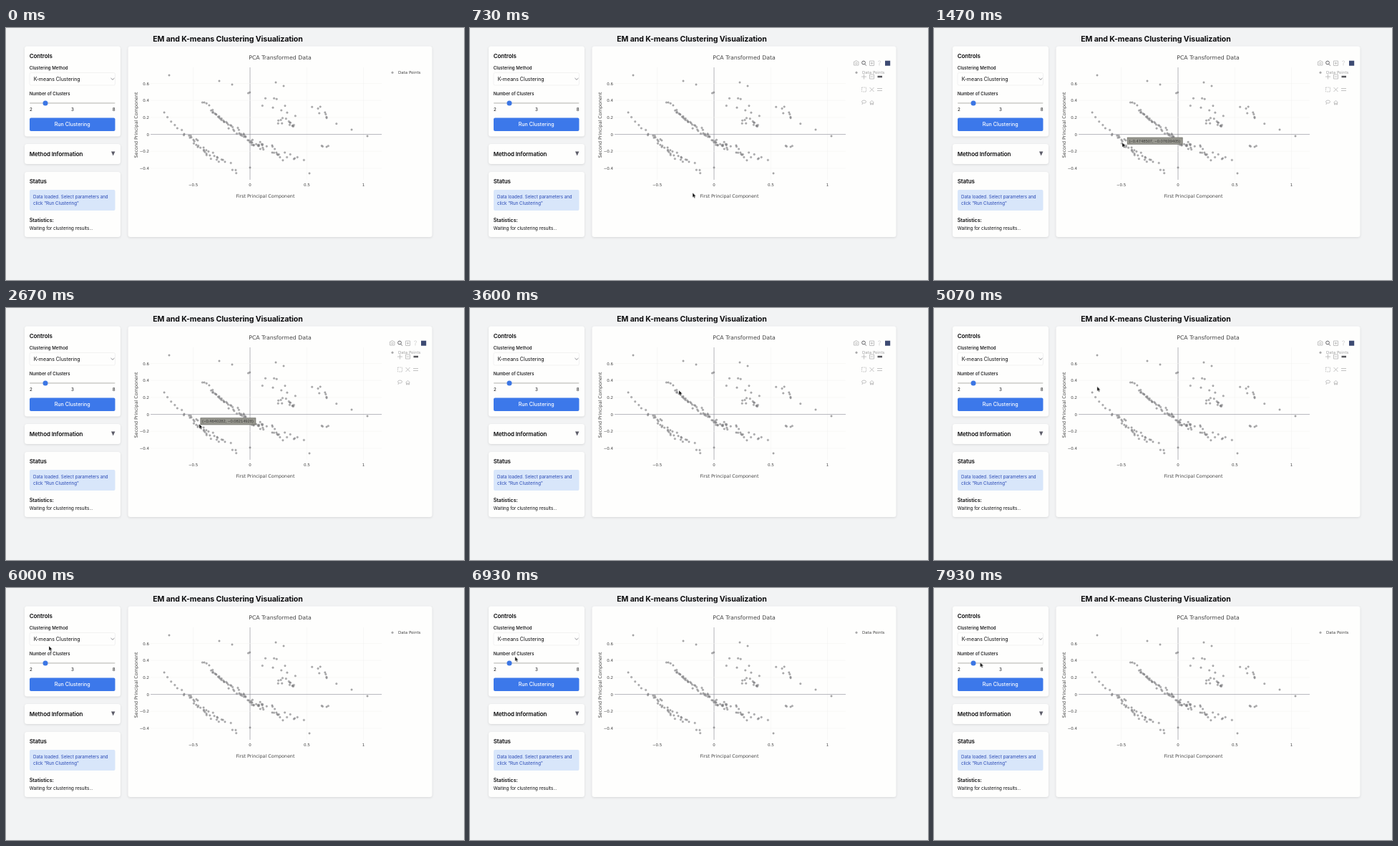
These frames come from a looping animation (640 by 352 pixels, 8 s). An HTML page:

```html
<!DOCTYPE html>
<html lang="en">
<head>
<meta charset="utf-8">
<title>Clustering Visualization</title>
<style>
  html, body { margin: 0; width: 100%; height: 100%; overflow: hidden; background: #f2f3f4; }
  svg { display: block; width: 640px; height: 352px; }
  text { font-family: Inter, sans-serif; font-size: 6.2px; fill: #0c0c0e; }
  .title { font-size: 10.6px; font-weight: 700; letter-spacing: -.1px; text-anchor: middle; }
  .head { font-size: 8px; font-weight: 600; letter-spacing: -.1px; }
  .label { font-size: 6.1px; font-weight: 500; }
  .body { font-size: 7px; }
  .bold { font-size: 7.1px; font-weight: 600; }
  .info { fill: #2546b4; }
  .button { font-size: 7.1px; font-weight: 500; fill: #fff; text-anchor: middle; }
  .card { fill: #fefefd; filter: drop-shadow(0 1.8px 1.6px #0000001c); }
  .plot text { font-family: "DejaVu Sans", sans-serif; font-size: 5.5px; fill: #444; }
  .plot .name { font-size: 7.8px; }
  .plot .axis { font-size: 6.4px; }
  .mid { text-anchor: middle; }
  .end { text-anchor: end; }
  .grid { stroke: #f1f1ee; stroke-width: .5; }
  .zero { stroke: #85858f; stroke-width: .6; }
  .dot { fill: #808084; fill-opacity: .6; stroke: #6c6c70; stroke-opacity: .6; stroke-width: .5; }
  .icons { fill: none; stroke: #bcbcbc; stroke-width: .9; }
  .icons .dark { stroke: #55555a; }
  .tip rect { fill: #97978f; stroke: #66665f; stroke-width: .7; }
  .tip text { font-family: "Liberation Sans", Arial, sans-serif; font-size: 5.8px; fill: #3c3c3a; }

  .icons, .tip, #cursor { animation: 8s linear infinite; }
  .icons { opacity: 0; animation-name: bar; }
  .tip { visibility: hidden; animation-timing-function: step-end; }
  #tipA { animation-name: tipA; }
  #tipB { animation-name: tipB; }
  #tipC { animation-name: tipC; }
  #cursor { animation-name: move; }
  @keyframes bar { 0%, 4% { opacity: 0; } 7%, 66% { opacity: 1; } 69%, 100% { opacity: 0; } }
  @keyframes tipA { 0% { visibility: hidden; } 15% { visibility: visible; } 25%, 100% { visibility: hidden; } }
  @keyframes tipB { 0% { visibility: hidden; } 25% { visibility: visible; } 38%, 100% { visibility: hidden; } }
  @keyframes tipC { 0% { visibility: hidden; } 51.5% { visibility: visible; } 59%, 100% { visibility: hidden; } }
  @keyframes move {
    0%, 1% { transform: translate(400px, 360px); animation-timing-function: ease-out; }
    18.4% { transform: translate(263px, 160px); }
    33.4% { transform: translate(270px, 162px); animation-timing-function: ease-in-out; }
    45% { transform: translate(292px, 115px); animation-timing-function: ease-in-out; }
    54.1% { transform: translate(342px, 129px); animation-timing-function: ease-in-out; }
    75% { transform: translate(60px, 81px); animation-timing-function: ease-in-out; }
    95%, 100% { transform: translate(64.5px, 104px); }
  }
</style>
</head>
<body>
<svg viewBox="0 0 640 352">
  <text class="title" x="310" y="18.5">EM and K-means Clustering Visualization</text>

  <rect class="card" x="26" y="25.5" width="134" height="126" rx="3.5"/>
  <rect class="card" x="26" y="162" width="134" height="28" rx="3.5"/>
  <rect class="card" x="26" y="201" width="134" height="91" rx="3.5"/>
  <rect class="card" x="170.5" y="25.5" width="425" height="266.5" rx="3.5"/>

  <text class="head" x="32.700" y="42">Controls</text>
  <text class="label" x="32.700" y="58">Clustering Method</text>
  <rect x="33" y="62.5" width="119.5" height="17.5" rx="2" fill="#fefefd" stroke="#ececec" stroke-width=".7"/>
  <text class="body" x="38.700" y="73.8">K-means Clustering</text>
  <path d="M146.5 70l2.5 2.3 2.5-2.3" fill="none" stroke="#77777c" stroke-width=".8"/>
  <text class="label" x="32.700" y="94">Number of Clusters</text>
  <rect x="33" y="103.800" width="119.5" height="2.300" rx="1.1" fill="#d9d9d6"/>
  <circle cx="55" cy="105" r="3.5" fill="#3b76e4"/>
  <text x="33" y="115.6">2</text>
  <text class="mid" x="93" y="115.6">3</text>
  <text class="end" x="152.5" y="115.6">8</text>
  <rect x="33" y="125.5" width="119.5" height="18.5" rx="2" fill="#3c78ea"/>
  <text class="button" x="92.7" y="137.3">Run Clustering</text>

  <text class="head" x="32.700" y="178.6">Method Information</text>
  <path d="M147 172.6h5.4l-2.7 6z" fill="#5c5c68"/>

  <text class="head" x="32.700" y="217">Status</text>
  <rect x="33" y="226" width="119.5" height="29" rx="2" fill="#d8e6fa"/>
  <text class="info" x="38" y="238.4">Data loaded. Select parameters and</text>
  <text class="info" x="38" y="247.4">click "Run Clustering"</text>
  <text class="bold" x="32.700" y="270.8">Statistics:</text>
  <text x="32.700" y="282.2">Waiting for clustering results...</text>

  <g class="plot">
    <text class="name mid" x="383" y="44.4">PCA Transformed Data</text>
    <text class="axis mid" x="362.5" y="237">First Principal Component</text>
    <text class="axis mid" transform="translate(184.3 135.5) rotate(-90)">Second Principal Component</text>
    <g id="axes"></g>
    <g id="dots"></g>
    <circle class="dot" cx="540" cy="62.3" r="1.3"/>
    <text x="548" y="64.3">Data Points</text>
  </g>

  <g class="icons">
    <rect x="545" y="60" width="36" height="50" fill="#fefefd" fill-opacity=".5" stroke="none"/>
    <path d="M536.5 47h1.5l.7-1.2h2l.7 1.2h1.5v5h-6.4z"/>
    <circle cx="539.7" cy="49.4" r="1.2"/>
    <path class="dark" d="M551.6 50.3l2.2 2.3"/>
    <circle class="dark" cx="550" cy="48.5" r="2.4"/>
    <path d="M558.5 46h6v6.5h-6zM559.8 49.2h3.5M561.5 47.5v3.5"/>
    <path d="M570 47q2.5-2.5 4 0l-2 2.5v3" stroke-opacity=".6"/>
    <rect x="580" y="45.7" width="7.2" height="7" fill="#3d4a72" stroke="none"/>
    <path d="M547 68h7M550.5 64.5v7M558.5 65h6v6h-6zM559.8 68h3.5"/>
    <path class="dark" d="M569.5 68h6.5" stroke-width="2.5"/>
    <path d="M547.5 83h6v6h-6z" stroke-dasharray="1.5 1"/>
    <path d="M558.5 83l6 6M564.5 83l-6 6M569 84.5h7M569 87.5h7"/>
    <ellipse cx="550.5" cy="103" rx="3" ry="2"/>
    <path d="M548.5 104.5l-.5 2.5M558.5 104l3-2.5 3 2.5M559.5 104v3h1.3v-2h1.4v2h1.3v-3"/>
  </g>

  <g id="tips"></g>

  <path id="cursor" d="M0 0v6.5l1.5-1.3 1 2.3 1.2-.5-1-2.2h2z" fill="#0a0a0a" stroke="#fff" stroke-width=".4"/>
</svg>
<script>
  const byId = id => document.getElementById(id);
  const add = (parent, tag, attrs, text = '') => {
    const node = document.createElementNS('http://www.w3.org/2000/svg', tag);
    for (const key in attrs) node.setAttribute(key, attrs[key]);
    node.textContent = text;
    parent.append(node);
    return node;
  };
  const px = v => 341 + v * 158.6;
  const py = v => 148.6 - v * 118.5;
  const label = v => String(v).replace('-', '−');
  const line = (v, x1, y1, x2, y2) => add(byId('axes'), 'line', { class: v ? 'grid' : 'zero', x1, y1, x2, y2 });

  for (let i = -1; i <= 2; i++) {
    const v = i / 2;
    line(v, px(v), 55, px(v), 212);
    add(byId('axes'), 'text', { x: px(v), y: 221, class: 'mid' }, label(v));
  }
  for (let i = -2; i <= 3; i++) {
    const v = i / 5;
    line(v, 202, py(v), 525, py(v));
    add(byId('axes'), 'text', { x: 200, y: py(v) + 2, class: 'end' }, label(v));
  }

  let seed = 7;
  const random = () => (seed = seed * 16807 % 2147483647) / 2147483647;
  const dot = (cx, cy) => add(byId('dots'), 'circle', { class: 'dot', cx, cy, r: 1.25 });

  // Evenly stepped points along a line, scattered by up to half the spread.
  const streak = ([x1, y1], [x2, y2], count, spread) => {
    for (let i = 0; i < count; i++) {
      const t = (i + random()) / count;
      dot(x1 + (x2 - x1) * t + (random() - .5) * spread,
          y1 + (y2 - y1) * t + (random() - .5) * spread);
    }
  };
  streak([219, 119], [246, 146], 6, 5);
  streak([247, 146], [270, 156], 9, 7);
  streak([263, 160], [301, 188], 24, 8);
  streak([306, 183], [326, 206], 5, 4);
  streak([273, 103], [290, 117], 7, 5);
  streak([289, 118], [311, 135], 16, 3);
  streak([312, 136], [342, 157], 20, 8);
  streak([337, 156], [352, 163], 12, 9);
  streak([352, 161], [392, 180], 22, 12);
  streak([392, 176], [412, 189], 5, 10);
  streak([383, 128], [404, 138], 14, 12);
  streak([340, 97], [400, 116], 11, 22);
  streak([425, 104], [461, 130], 9, 12);
  streak([436, 166], [453, 166], 4, 5);

  const outliers = [[228, 66], [298, 74], [316, 79], [377, 76], [388, 81], [483, 142], [505, 151], [424, 203], [341, 195]];
  outliers.forEach(([x, y]) => dot(x, y));

  const tip = (id, x, y) => {
    const group = add(byId('tips'), 'g', { id, class: 'tip', transform: `translate(${px(x)} ${py(y)})` });
    add(group, 'rect', { x: 4.5, y: -4.6, width: 77, height: 9.2 });
    add(group, 'text', { x: 6.7, y: 2.1 }, `(${label(x)}, ${label(y)})`);
  };
  tip('tipA', -0.4748507, -0.07639405);
  tip('tipB', -0.4640282, -0.08214928);
  tip('tipC', -0.0197224, -0.01788629);
</script>
</body>
</html>
```
